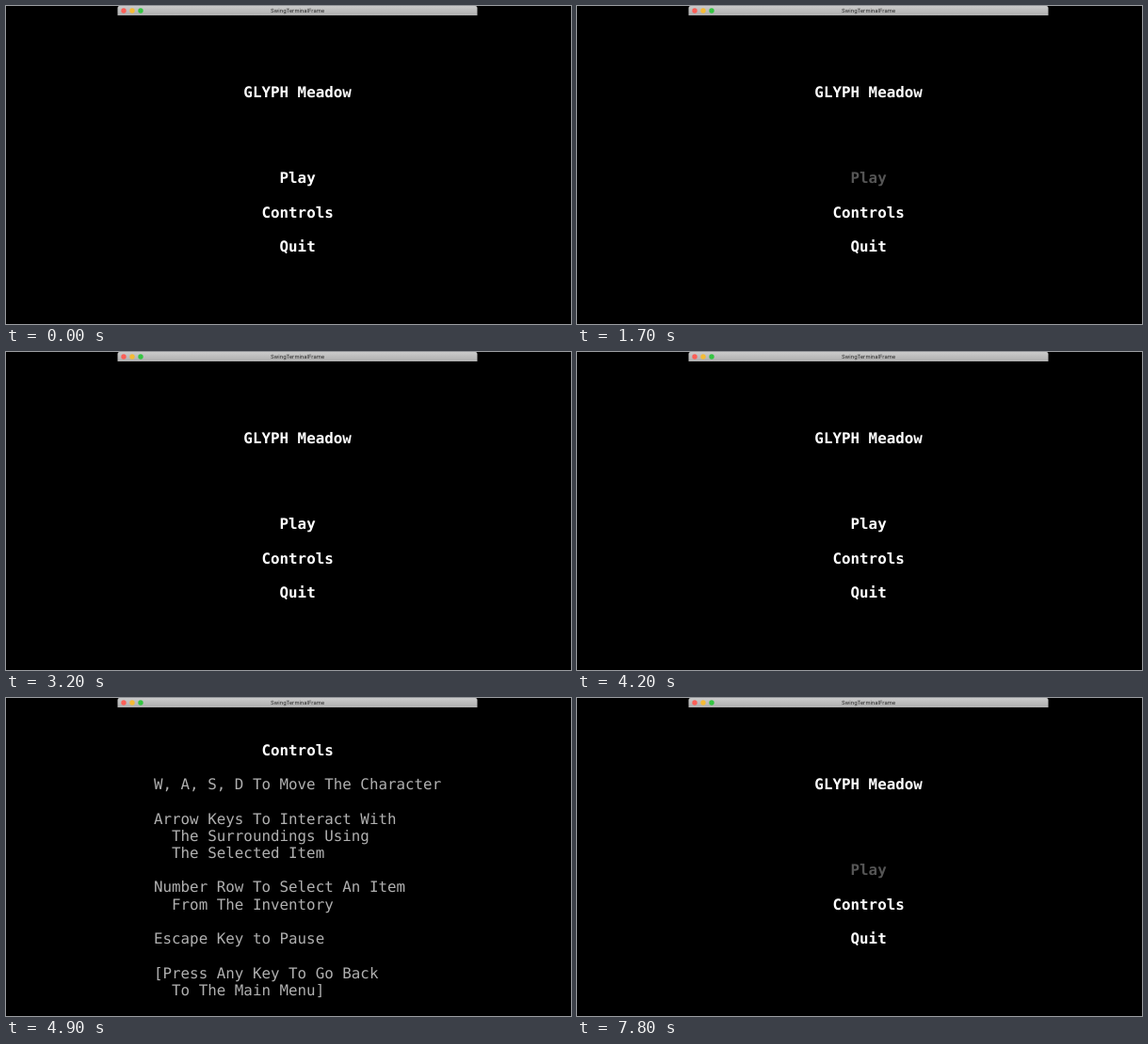
An HTML page for the animation above (8000 ms loop, 600 px wide and 338 px high).

```html
<!DOCTYPE html>
<html lang="en">
<head>
<meta charset="utf-8">
<title>Terminal menu</title>
<style>
  html, body { margin: 0; width: 100%; height: 100%; overflow: hidden; background: #000; }
  svg { display: block; width: 600px; height: 338px; text-rendering: geometricPrecision; }
  .cell { font: 15.85px "DejaVu Sans Mono", monospace; fill: #b0b0b0; }
  .bold { font-weight: bold; fill: #fff; }
  .dim { fill: #555; }
  .bar { font: 5.8px Inter, sans-serif; fill: #222; text-anchor: middle; }
</style>
</head>
<body>
<svg viewBox="0 0 600 338">
  <defs>
    <linearGradient id="metal" x2="0" y2="1">
      <stop stop-color="#cbcbcb"/><stop offset="1" stop-color="#aeaeae"/>
    </linearGradient>
  </defs>
  <rect width="600" height="338"/>
  <path d="M118.5 10V2q0-2 2-2H498.500q2 0 2 2V10Z" fill="url(#metal)"/>
  <circle cx="125" cy="5" r="2.7" fill="#fc5f57"/>
  <circle cx="134" cy="5" r="2.7" fill="#f5bb36"/>
  <circle cx="143" cy="5" r="2.7" fill="#34c542"/>
  <text class="bar" x="309.500" y="7.200">SwingTerminalFrame</text>
  <g id="screen"></g>
</svg>
<script>
  const LOOP = 8000;
  const screen = document.getElementById('screen');

  // Text sits on a terminal grid of 40 columns.
  const put = (col, row, text, style = '') =>
    `<text class="cell ${style}" x="${118.8 + 9.54 * col}" y="${24.2 + 18.22 * row}">${text}</text>`;

  const options = [[18, 9, 'Play'], [16, 11, 'Controls'], [18, 13, 'Quit']];
  const option = (i, dim) => put(...options[i], dim ? 'bold dim' : 'bold');

  const menu = dimmed => put(14, 4, 'GLYPH Meadow', 'bold') +
    options.map((_, i) => option(i, i === dimmed)).join('');

  const help = put(16, 2, 'Controls', 'bold') + [
    [4, 4, 'W, A, S, D To Move The Character'],
    [4, 6, 'Arrow Keys To Interact With'],
    [6, 7, 'The Surroundings Using'],
    [6, 8, 'The Selected Item'],
    [4, 10, 'Number Row To Select An Item'],
    [6, 11, 'From The Inventory'],
    [4, 13, 'Escape Key to Pause'],
    [4, 15, '[Press Any Key To Go Back'],
    [6, 16, 'To The Main Menu]']
  ].map(line => put(...line)).join('');

  const steps = [
    [0, menu()], [600, menu(0)], [1300, menu()], [1700, menu(0)],
    [1900, menu(1)], [2200, menu()], [2600, menu(1)], [2700, menu(2)],
    [3200, menu()], [3700, menu(2)], [3800, menu(1)], [4200, menu()],
    [4600, help + option(0, true)], // the blinking option lingers briefly
    [4900, help], [7500, menu()], [7800, menu(0)]
  ];

  const start = performance.now();
  let shown;
  function draw() {
    const t = (performance.now() - start) % LOOP;
    const step = steps.findLast(s => s[0] <= t);
    if (step !== shown) {
      shown = step;
      screen.innerHTML = step[1];
    }
    requestAnimationFrame(draw);
  }
  draw();
</script>
</body>
</html>
```
